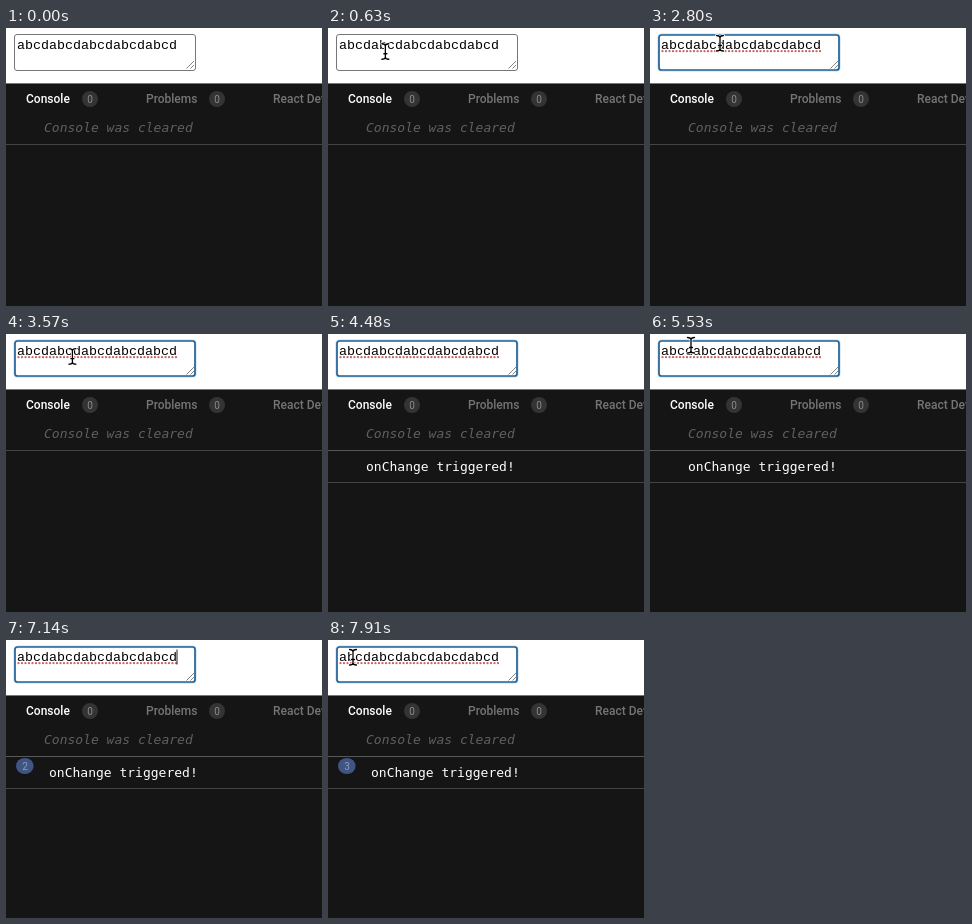
An HTML page for the animation above (8 s loop, 316 by 278 pixels).

```html
<!DOCTYPE html>
<html lang="en">
<meta charset="utf-8">
<title>onChange demo</title>
<style>
  html, body { margin: 0; height: 100%; overflow: hidden; background: #151515; }
  svg { display: block; width: 100vw; height: 100vh; }
  text { white-space: pre; }
  .input { font: 13.333px "Liberation Mono", monospace; }
  .log { font: 13px "DejaVu Sans Mono", monospace; fill: #fff; }
  .cleared { font-style: italic; fill: #606060; }
  .tab { font: 500 12px Roboto, sans-serif; fill: #757575; }
  .count { font: 10px Roboto, sans-serif; fill: #8c8c8c; text-anchor: middle; }
</style>
<svg viewBox="0 0 316 278">
  <rect width="316" height="278" fill="#151515"/>
  <rect width="316" height="55" fill="#fff"/>
  <path d="M0 55.5H316" stroke="#777"/>

  <rect id="border" x="8.5" y="6.5" width="181" height="36" rx="2.5" fill="#fff" stroke="#767676"/>
  <g id="ring" fill="#fff">
    <rect x="8.5" y="6.5" width="181" height="36" rx="3" stroke="#c4dcec" stroke-width="2"/>
    <rect x="9" y="7" width="180" height="35" rx="2.5" stroke="#226296" stroke-width="1.7"/>
  </g>
  <path d="M180.5 40.5L188 33M184.5 40.5L188 37" stroke="#777" stroke-width=".9"/>
  <text class="input" x="11" y="21">abcdabcdabcdabcdabcd</text>
  <path id="spelling" d="M12.5 23.2H171" stroke="#cb6666" stroke-width="2.3" stroke-linecap="round" stroke-dasharray="0 3.5"/>
  <path id="caret" d="M171 9.5V24.5" stroke="#222"/>

  <text class="tab" x="20" y="74.6" style="fill:#fff">Console</text>
  <text class="tab" x="140" y="74.6">Problems</text>
  <text class="tab" x="267" y="74.6">React DevTools</text>
  <g fill="#343434"><circle cx="84" cy="71" r="8"/><circle cx="211" cy="71" r="8"/></g>
  <text class="count" x="84" y="74.5">0</text>
  <text class="count" x="211" y="74.5">0</text>

  <text class="log cleared" x="38" y="104.4">Console was cleared</text>
  <path id="rule" d="M0 116.5H316" stroke="#444"/>
  <g id="entry">
    <path d="M0 148.5H316" stroke="#444"/>
    <text id="message" class="log" y="136.5">onChange triggered!</text>
    <g id="badge">
      <ellipse cx="18.8" cy="126" rx="8.8" ry="8" fill="#405584"/>
      <text id="repeats" class="count" x="19" y="129.5" style="fill:#8f9cba"></text>
    </g>
  </g>

  <g id="pointer">
    <path id="arrow" d="M0 0V15L3.5 11.8L5.8 17L8.3 16L6 10.9H10.7Z" stroke="#fff"/>
    <g id="beam" fill="none" stroke-linecap="round">
      <use href="#beamShape" stroke="#fff" stroke-width="2.8"/>
      <use href="#beamShape" stroke="#000" stroke-width="1.3"/>
    </g>
  </g>
  <defs>
    <path id="beamShape" d="M-3.5-7.5Q0-7.5 0-5Q0-7.5 3.5-7.5M0-5V6M-3.5 8Q0 8 0 6Q0 8 3.5 8M-1.5 2.5H1.5"/>
  </defs>
</svg>
<script>
  const LOOP = 8000, STEP = 70, BLINK = 495;
  const $ = id => document.getElementById(id);
  const show = (id, on) => $(id).style.display = on ? '' : 'none';

  const keys = [3980, 6090, 7140];
  const logs = [4130, 6230, 7210];

  // Pointer moves: start ms, end ms, destination
  const home = { x: 152, y: 228 };
  const moves = [
    [70, 700, 54, 16],
    [1190, 1610, 82, -4],
    [2030, 2520, 70, 15],
    [3290, 3640, 66, 23],
    [5040, 5530, 41, 11],
    [5530, 5880, 38, 11],
    [6720, 6790, 38, 11],
    [7350, 7490, 32, 18],
    [7560, 7910, 25, 17]
  ];

  const ease = k => k * k * (3 - 2 * k);
  const latest = (times, t) => Math.max(-Infinity, ...times.filter(at => at <= t));

  function pointerAt(t) {
    let { x, y } = home;
    for (const [from, to, endX, endY] of moves) {
      const k = ease(Math.min(1, Math.max(0, (t - from) / (to - from))));
      x += (endX - x) * k;
      y += (endY - y) * k;
    }
    // a quick sideways shake
    if (t > 5040 && t < 5880) x += 13 * Math.sin((t - 5530) / 280 * 2 * Math.PI);
    return [x, y];
  }

  function draw(now) {
    const t = Math.floor(now % LOOP / STEP) * STEP;
    const focused = t >= 980 && t < 1540 || t >= 2240;
    show('border', !focused);
    show('ring', focused);
    show('spelling', t >= 2660);

    // typing hides the pointer until it moves again, and restarts the caret blink
    const key = latest(keys, t);
    const sinceKey = t - key;
    show('caret', sinceKey < 3 * BLINK && sinceKey % (2 * BLINK) < BLINK);
    show('pointer', latest(moves.map(m => m[0]), t) > key);

    const count = logs.filter(at => t >= at).length;
    show('entry', count > 0);
    show('badge', count > 1);
    $('message').setAttribute('x', count > 1 ? 43 : 38);
    $('repeats').textContent = count;
    $('rule').setAttribute('stroke', count ? '#585858' : '#444');

    const [x, y] = pointerAt(t);
    const inField = y > 5 && y < 43;
    show('beam', inField);
    show('arrow', !inField);
    $('pointer').setAttribute('transform', `translate(${x} ${y})`);
  }

  const start = performance.now();
  function tick() {
    draw(performance.now() - start);
    requestAnimationFrame(tick);
  }
  tick();
</script>
</html>
```
